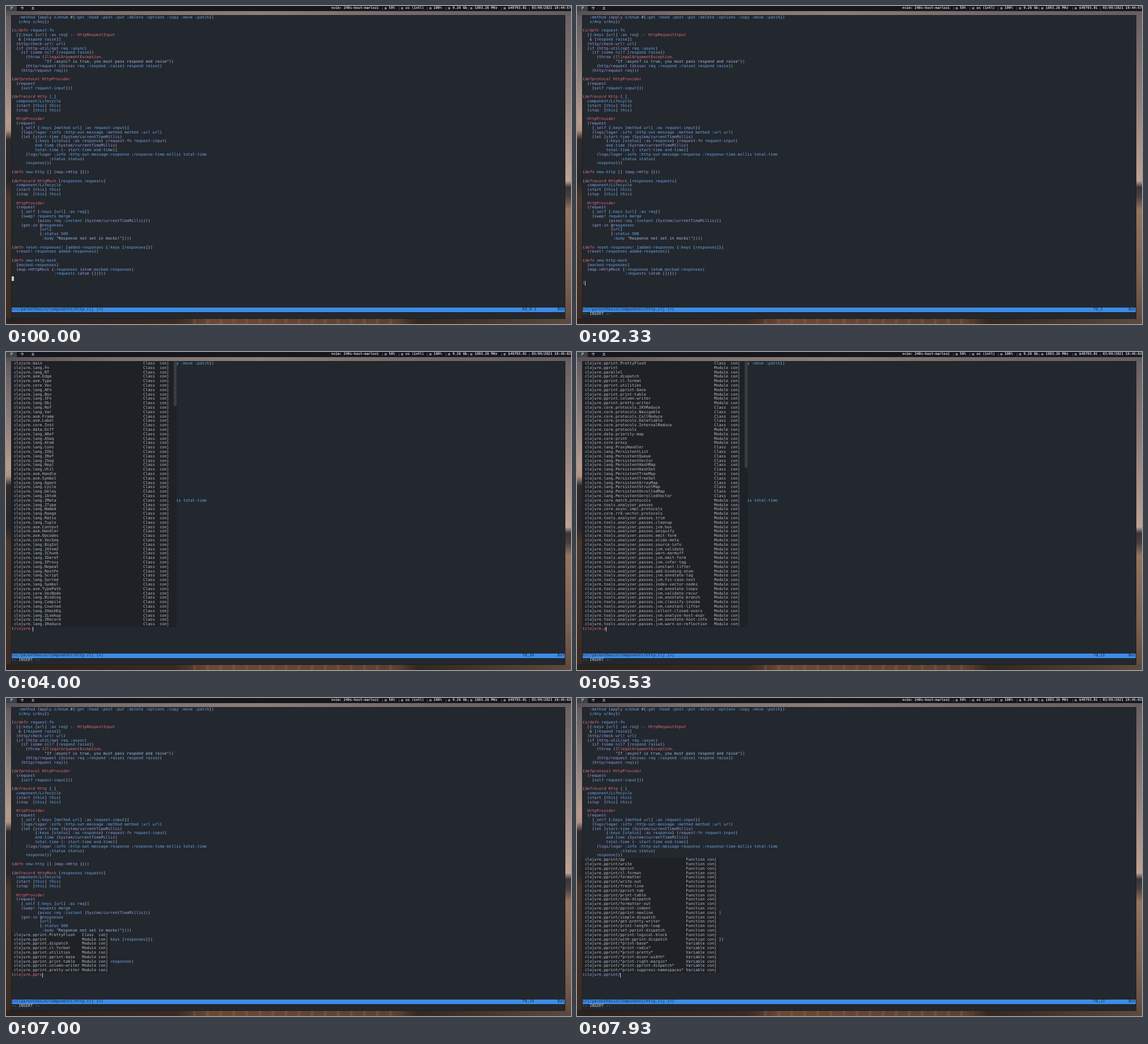
An HTML page that plays this animation: 997 px wide and 561 px high, repeating every 8000 ms.

```html
<!DOCTYPE html>
<html lang="en">
<head>
<meta charset="utf-8">
<title>Editor completion</title>
<style>
  html, body { margin: 0; width: 100%; height: 100%; overflow: hidden; }
  body {
    position: relative;
    background:
      linear-gradient(90deg, #575154, #7a6e6d 18%, #8d7d78 45%, #6f6667 75%, #655d5f) 0 8px / 100% 9px no-repeat,
      repeating-linear-gradient(94deg, #0000 0 9px, #a06e4a55 13px, #0000 17px 23px) 320px 551px / 380px 10px no-repeat,
      linear-gradient(90deg, #2b211d, #3a2a22 30%, #6b4833 36%, #5c4030 69%, #33271f 73%, #5e4a3e) 0 551px / 100% 10px no-repeat,
      linear-gradient(#5b5558, #857775 18%, #b89a8a 36%, #b3937f 39%, #2f2a2b 42%, #2a2627 55%, #4a352b 60%, #3a2a22) 0 0 / 10px 100% no-repeat,
      linear-gradient(#655d5f, #8a7a77 25%, #bfa294 55%, #3a3438 57%, #4a4042 60%, #94755f 64%, #7d6252 85%, #5e4a3e) 987px 0 / 10px 100% no-repeat,
      #23272e;
    font-family: "DejaVu Sans Mono", "Noto Sans Mono", monospace;
    text-rendering: geometricPrecision;
  }
  div, pre, #bar span, #bar i { position: absolute; top: 0; left: 0; margin: 0; white-space: pre; font-family: inherit; }

  #bar { width: 997px; height: 8.5px; background: #15171c; overflow: hidden;
         color: #d3d7de; font-weight: bold; font-size: 6.06px; line-height: 8.5px; }
  #bar .tag { width: 19px; text-align: center; font-family: "Noto Sans CJK JP", "Noto Sans CJK", sans-serif; }
  #bar .on { background: #3d4148; }
  #bar .sep { top: 2px; width: 1px; height: 5px; background: #555a63; }
  #bar .icon { top: 2.2px; width: 4px; height: 4px; background: #757b85; border-radius: 1px; }

  #win { left: 9px; top: 16px; width: 978px; height: 536px; box-sizing: border-box;
         background: #23272e; border: 1px solid #1b1e24; }
  #text { left: 9.8px; top: 17.1px; width: 976px; height: 530.4px;
          font-size: 6.9px; line-height: 7.8px; color: #b4bcc9; }
  #typed { top: 468px; }
  #cursor { background: #c8ccd4; height: 7.8px; }
  #popup { background: #1e2126; color: #b9bfc9; }
  #thumb { width: 4.2px; background: #393d44; }
  #status { top: 514.8px; width: 976px; height: 7.8px; background: #3c8ce7; color: #1d2733; }
  #mode { top: 522.6px; color: #c3c9d3; }
  #ruler { left: 901.2px; }
  #place { left: 963.5px; }

  .def { color: #e2707c; font-style: italic; }
  .type { color: #e06c78; }
  .call { color: #979fe2; }
  .sym { color: #6aaae4; }
  .str { color: #a3c0e2; }
  .draft span { color: #9aa2ae; }
</style>
</head>
<body>
<div id="bar"></div>
<div id="win"></div>
<div id="text">
  <pre id="code"></pre>
  <pre id="typed"></pre>
  <div id="cursor"></div>
  <pre id="popup"></pre>
  <div id="thumb"></div>
  <div id="status">src/parenthesin/components/http.clj [+]<div id="ruler"></div><div id="place">Bot</div></div>
  <div id="mode">-- INSERT --</div>
</div>
<script>
const CELL = 4.153, ROW = 7.8, LOOP = 8000;
const $ = id => document.getElementById(id);

const source = `   :method (apply s/enum #{:get :head :post :put :delete :options :copy :move :patch})
   s/Any s/Any})

(s/defn request-fn
  [{:keys [url] :as req} :- HttpRequestInput
   & [respond raise]]
  (http/check-url! url)
  (if (http-util/opt req :async)
    (if (some nil? [respond raise])
      (throw (IllegalArgumentException.
              "If :async? is true, you must pass respond and raise"))
      (http/request (dissoc req :respond :raise) respond raise))
    (http/request req)))

(defprotocol HttpProvider
  (request
    [self request-input]))

(defrecord Http [_]
  component/Lifecycle
  (start [this] this)
  (stop  [this] this)

  HttpProvider
  (request
    [_self {:keys [method url] :as request-input}]
    (logs/logar :info :http-out-message :method method :url url)
    (let [start-time (System/currentTimeMillis)
          {:keys [status] :as response} (request-fn request-input)
          end-time (System/currentTimeMillis)
          total-time (- start-time end-time)]
      (logs/logar :info :http-out-message-response :response-time-millis total-time
                :status status)
      response)))

(defn new-http [] (map->Http {}))

(defrecord HttpMock [responses requests]
  component/Lifecycle
  (start [this] this)
  (stop  [this] this)

  HttpProvider
  (request
    [_self {:keys [url] :as req}]
    (swap! requests merge
           (assoc req :instant (System/currentTimeMillis)))
    (get-in @responses
            [url]
            {:status 500
             :body "Response not set in mocks!"})))

(defn reset-responses! [added-responses {:keys [responses]}]
  (reset! responses added-responses))

(defn new-http-mock
  [mocked-responses]
  (map->HttpMock {:responses (atom mocked-responses)
                  :requests (atom [])}))`;

// Expands "group: a b c; group: d" into full names.
const expand = spec => spec.split(";").flatMap(part => {
  const [group, names] = part.split(":");
  return names.trim().split(/\s+/).map(n => "clojure." + group.trim() + n);
});

const pprint = expand(`pprint.:PrettyFlush; :pprint; pprint.:dispatch cl-format utilities
  pprint-base print-table column-writer pretty-writer`);

const classes = expand(`:main; lang.:Fn RT; asm.:Edge Type; core.:Vec; lang.:AFn Box IFn Obj Ref Var;
  asm.:Frame Label; core.:Inst; data.:Diff; lang.:ARef ASeq Atom Cons IObj IRef ISeq Repl Util;
  asm.:Handle Symbol; lang.:Agent Cycle Delay IAtom IMeta IType Named Range Ratio Tuple;
  asm.:Context Handler Opcodes; core.:VecSeq; lang.:BigInt IAtom2 IChunk IDeref IProxy Repeat
  RestFn Script Sorted Symbol; asm.:TypePath; core.:VecNode; lang.:Binding Compile Counted
  IHashEq ILookup IRecord IReduce`);

const modules = [...pprint.slice(0, 2), "clojure.parallel", ...pprint.slice(2), ...expand(`
  core.protocols.:IKVReduce Navigable CollReduce Datafiable InternalReduce;
  :core.protocols data.priority-map core-print core-proxy lang.ProxyHandler;
  lang.Persistent:List Queue Vector HashMap HashSet TreeMap TreeSet ArrayMap StructMap
  UnrolledMap UnrolledVector;
  :core.match.protocols tools.analyzer.passes core.async.impl.protocols core.rrb-vector.protocols;
  tools.analyzer.passes.:trim cleanup jvm.box uniquify emit-form elide-meta source-info
  jvm.validate warn-earmuff jvm.emit-form jvm.infer-tag constant-lifter add-binding-atom
  jvm.annotate-tag jvm.fix-case-test index-vector-nodes jvm.annotate-loops jvm.validate-recur
  jvm.annotate-branch jvm.classify-invoke jvm.constant-lifter collect-closed-overs
  jvm.analyze-host-expr jvm.annotate-host-info jvm.warn-on-reflection`)];

const members = expand(`pprint/:pp write pprint cl-format formatter write-out fresh-line pprint-tab
  print-table code-dispatch formatter-out pprint-indent pprint-newline simple-dispatch
  get-pretty-writer print-length-loop set-pprint-dispatch pprint-logical-block with-pprint-dispatch
  *print-base* *print-radix* *print-pretty* *print-miser-width* *print-right-margin*
  *print-pprint-dispatch* *print-suppress-namespaces*`);

const moduleKind = n => /\.[A-Z]/.test(n) ? "Class" : "Module";
const popups = {
  classes: { items: classes, kind: () => "Class", kindCol: 56, kindLen: 7, cols: 70, thumb: 10 },
  modules: { items: modules, kind: moduleKind, kindCol: 56, kindLen: 7, cols: 70, thumb: 24 },
  pprint: { items: pprint, kind: moduleKind, kindCol: 30, kindLen: 7, cols: 42, thumb: 0 },
  members: { items: members, kind: n => n.includes("*") ? "Variable" : "Function",
             kindCol: 44, kindLen: 9, cols: 58, thumb: 0 }
};

// [start, typed line (null in normal mode), popup]
const steps = [
  [0, null], [730, ""], [1200, "("], [1800, "(d"], [2270, "("],
  [2930, "(c"], [3070, "(cl"], [3200, "(clo"], [3270, "(cloj"], [3400, "(cloju"],
  [3530, "(clojur"], [3600, "(clojure"], [3800, "(clojure."],
  [3930, "(clojure.", "classes"], [4930, "(clojure.p", "classes"],
  [5530, "(clojure.p", "modules"], [6000, "(clojure.pp", "modules"],
  [6130, "(clojure.ppr", "modules"], [6270, "(clojure.ppri", "modules"],
  [6470, "(clojure.ppri", "pprint"], [7330, "(clojure.pprin", "pprint"],
  [7470, "(clojure.pprint", "pprint"], [7670, "(clojure.pprint/", "pprint"],
  [7870, "(clojure.pprint/", "members"]
];
const CLOCK_TICK = 3930;

function tokenClass(word, before) {
  if (word[0] === '"') return "str";
  if (/^[()\[\]{}#@&\s]/.test(word)) return "";
  if (/^(s\/)?def/.test(word)) return "def";
  if (/^(Http|Illegal|clojure\.[^\/]*$)/.test(word)) return "type";
  return before === "(" ? "call" : "sym";
}

function paint(el, text) {
  el.textContent = "";
  for (const m of text.matchAll(/"[^"]*"|[()\[\]{}#@&]|\s+|[^\s()\[\]{}#@&"]+/g)) {
    const span = document.createElement("span");
    span.className = tokenClass(m[0], text[m.index - 1]);
    span.textContent = m[0];
    el.append(span);
  }
}

const toggle = (id, on) => $(id).style.display = on ? "" : "none";

function showPopup(p) {
  toggle("popup", p);
  toggle("thumb", p && p.thumb);
  if (!p) return;
  $("popup").textContent = p.items.map(n =>
    (" " + n).padEnd(p.kindCol) + p.kind(n).padEnd(p.kindLen) + "conj").join("\n");
  Object.assign($("popup").style, {
    top: (60 - p.items.length) * ROW + "px",
    width: p.cols * CELL + "px",
    height: p.items.length * ROW + "px"
  });
  Object.assign($("thumb").style, {
    left: (p.cols - 1) * CELL + "px", height: p.thumb * ROW + "px"
  });
}

function show([, typed, popup]) {
  const insert = typed !== null;
  const line = typed || "";
  paint($("typed"), line);
  $("typed").className = line.includes(".") ? "" : "draft";
  toggle("mode", insert);
  $("ruler").textContent = (insert ? "70," : "69,") + (line ? line.length + 1 : "0-1");
  Object.assign($("cursor").style, {
    left: line.length * CELL + "px",
    top: (insert ? 60 : 59) * ROW + "px",
    width: (insert ? 0.8 : CELL) + "px"
  });
  showPopup(popups[popup]);
}

function buildBar() {
  const add = (tag, cls, left, text = "") => {
    const el = document.createElement(tag);
    el.className = cls;
    el.style.left = left + "px";
    el.textContent = text;
    $("bar").append(el);
    return el;
  };
  ["ア", "ウ", "エ"].forEach((t, i) => add("span", i ? "tag" : "tag on", i * 19, t));
  add("span", "", 574, "nvim: 240s-host-marlozi");
  [[675.5, "58%"], [705, "us (intl)"], [754.5, "100%"], [788, "9.26 Gb"],
   [827, "1893.26 MHz"], [886, "$49793.01"]].forEach(([x, text]) => {
    add("i", "sep", x - 12);
    add("i", "icon", x - 8);
    add("span", "", x, text);
  });
  add("i", "sep", 922.5);
  return add("span", "", 927.7);
}

paint($("code"), source);
const clock = buildBar();
let current = null;

function tick() {
  const t = performance.now() % LOOP;
  const step = steps.findLast(s => s[0] <= t);
  if (step !== current) {
    current = step;
    show(step);
    clock.textContent = "03/09/2021 19:4" + (t < CLOCK_TICK ? "4:57" : "5:02");
  }
  requestAnimationFrame(tick);
}
tick();
</script>
</body>
</html>
```
